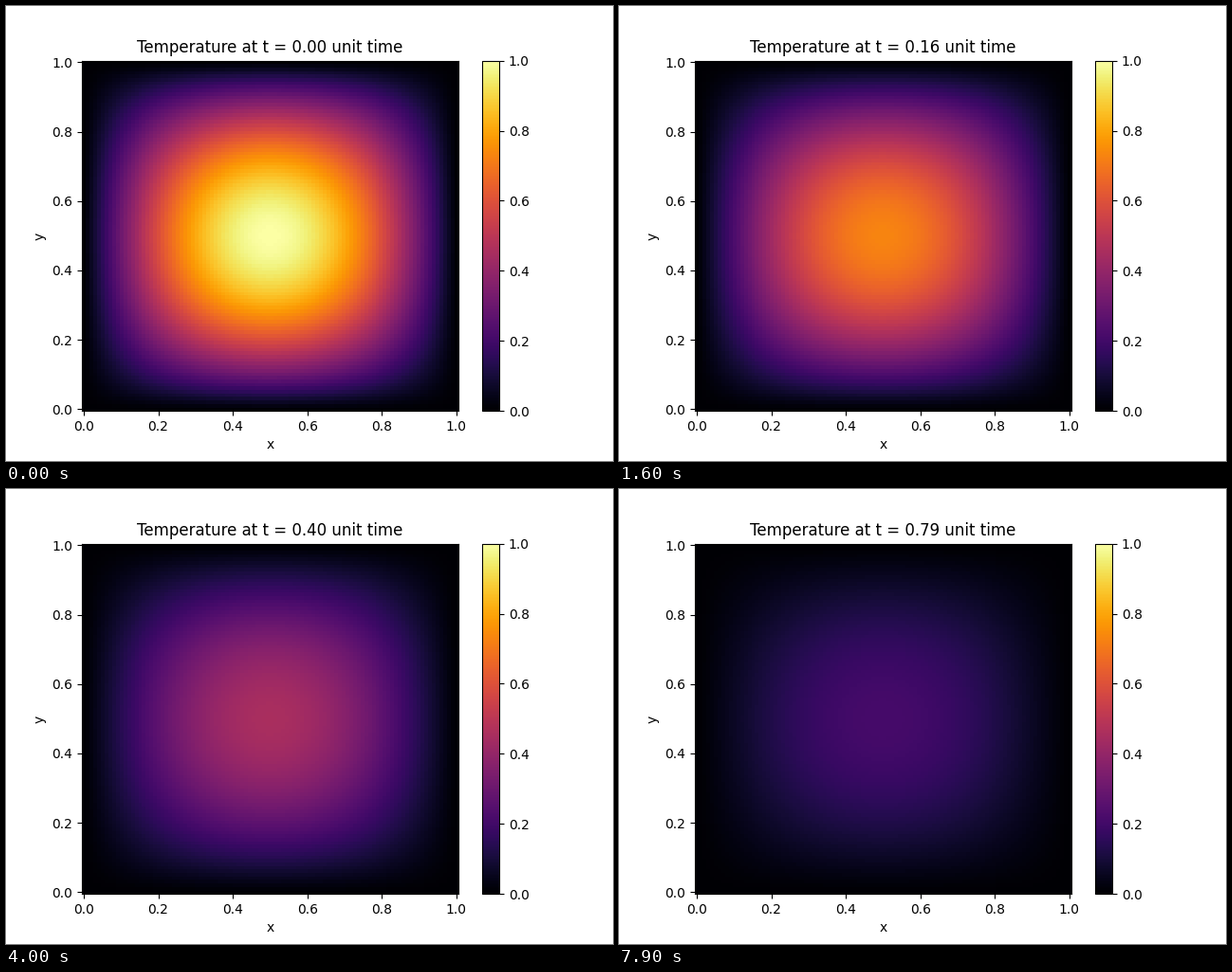
Write a matplotlib script that moves like this. It is 640 px wide and 480 px high and loops after 8000 ms.

```python
import numpy as np
import matplotlib.pyplot as plt
from matplotlib.animation import FuncAnimation

N = 100          # grid points per side
ALPHA = 0.1      # thermal diffusivity
DT = 0.01        # time per frame
FRAMES = 80
INTERVAL = 100   # ms

axis = np.linspace(0, 1, N)
X, Y = np.meshgrid(axis, axis)
mode = np.sin(np.pi * X) * np.sin(np.pi * Y)


def temperature(t):
    """Exact decay of the first mode of the heat equation."""
    return mode * np.exp(-2 * np.pi**2 * ALPHA * t)


fig, ax = plt.subplots(figsize=(6.4, 4.8), dpi=100)
mesh = ax.pcolormesh(X, Y, temperature(0), cmap="inferno",
                     vmin=0, vmax=1, shading="nearest")
fig.colorbar(mesh, ax=ax)
ax.set_xlabel("x")
ax.set_ylabel("y")
title = ax.set_title("")


def update(i):
    t = i * DT
    mesh.set_array(temperature(t))
    title.set_text(f"Temperature at t = {t:.2f} unit time")
    return mesh, title


anim = FuncAnimation(fig, update, frames=FRAMES, interval=INTERVAL,
                     repeat=True, repeat_delay=0, blit=False)
plt.show()
```
